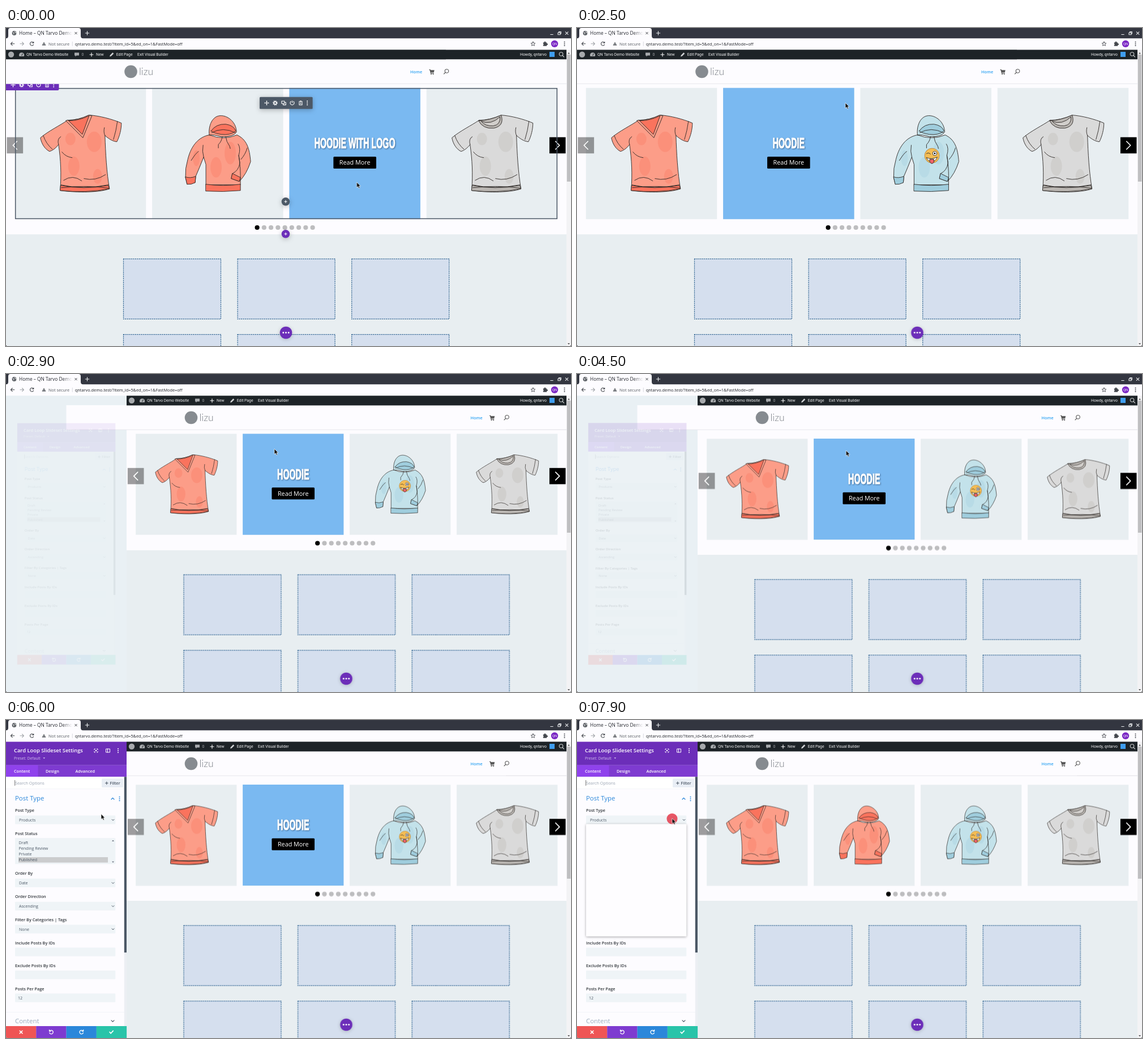
An HTML page that plays this animation: 998x561 px, repeating every 8 s.

```html
<!DOCTYPE html>
<html lang="en">
<head>
<meta charset="utf-8">
<title>Page builder demo</title>
<style>
html, body { margin: 0; width: 100%; height: 100%; overflow: hidden; background: #1c1e22; }
#stage { display: block; width: 998px; height: 561px; border-radius: 0 0 3px 3px; }
text { white-space: pre; }
.ui { font-family: "Noto Sans", sans-serif; }
.bar { font: 6.85px Roboto, sans-serif; fill: #f0f0f1; }
.os { font-family: "Open Sans", sans-serif; }
.semi { font-weight: 600; }
.line { fill: none; stroke-linecap: round; stroke-linejoin: round; }
.ink { stroke: #2b2624; stroke-width: .9; stroke-linejoin: round; stroke-linecap: round; }
.icon { fill: none; stroke: #fff; stroke-width: 1.1; stroke-linejoin: round; }
.headline { font: bold 26px "Liberation Sans", Arial, sans-serif; fill: #fff; stroke: #fff; stroke-width: 1.1; text-anchor: middle; }
.shade { filter: drop-shadow(1.4px 1.8px .8px rgba(25, 55, 90, .6)); }

/* One 8 s clock for every moving part: 100 ms = 1.25% */
.a { animation: 8s linear infinite; }
.cut { animation-timing-function: step-end; }
#cursor { animation-name: point; }
#hoverLogo { animation-name: leaveLogo; }
#hoverWide { animation-name: enterHood; }
#hoverSlim { animation-name: leaveHood; }
#tap1 { animation-name: tap1; }
#tap2 { animation-name: tap2; }
#tools { animation-name: tools; }
#wide { animation-name: wide; }
#slim { animation-name: slim; }
#barLeft { animation-name: barLeft; }
#head { animation-name: head; }
#lower { animation-name: lower; }
#backdrop { animation-name: backdrop; }
#thumb { animation-name: thumb; transform-origin: 994px 47px; }
#more { animation-name: more; }
#panel { animation-name: panel; transform-origin: 106.5px 299.5px; }
#menu { animation-name: menu; }

@keyframes point {
  0%, 1% { transform: translate(619.5px, 272px); animation-timing-function: ease-in-out; }
  9.4%, 46% { transform: translate(474px, 132px); }
  50%, 58.75% { transform: translate(475.3px, 135px); animation-timing-function: ease-in-out; }
  70%, 87.5% { transform: translate(168px, 165.7px); animation-timing-function: ease-in-out; }
  92.5%, 100% { transform: translate(168px, 173.5px); }
}
@keyframes leaveLogo { 0%, 5.5% { opacity: 1; } 9.2%, 100% { opacity: 0; } }
@keyframes enterHood { 0%, 16.25% { opacity: 0; } 20%, 100% { opacity: 1; } }
@keyframes leaveHood { 0%, 76.25% { opacity: 1; } 80%, 100% { opacity: 0; } }
@keyframes tap1 { 0%, 8.4% { opacity: 0; } 9.4%, 12.5% { opacity: .8; } 15%, 100% { opacity: 0; } }
@keyframes tap2 { 0%, 94% { opacity: 0; } 95.5%, 100% { opacity: .72; } }
@keyframes tools { 0% { visibility: visible; } 13.75%, 100% { visibility: hidden; } }
@keyframes wide { 0% { visibility: visible; } 33.12%, 100% { visibility: hidden; } }
@keyframes slim {
  0% { visibility: hidden; transform: none; }
  33.12% { visibility: visible; transform: none; }
  38.6%, 100% { visibility: visible; transform: translateY(8.5px); }
}
@keyframes barLeft { 0% { transform: none; } 33.12%, 100% { transform: translateX(213px); } }
@keyframes head { 0% { transform: none; } 33.12%, 100% { transform: translateX(106.5px); } }
@keyframes lower {
  0% { transform: none; }
  33.12% { transform: translate(106.5px, -53.3px); }
  38.6%, 100% { transform: translate(106.5px, -44.8px); }
}
@keyframes backdrop { 0% { visibility: hidden; } 33.12%, 100% { visibility: visible; } }
@keyframes thumb { 0% { transform: none; } 33.12%, 100% { transform: scaleY(1.04); } }
@keyframes more {
  0%, 18.75% { transform: none; animation-timing-function: ease-in-out; }
  23.75%, 100% { transform: translateX(106.5px); }
}
@keyframes panel {
  0%, 33.6% { opacity: 0; transform: scale(.815); }
  36.2% { opacity: .08; transform: scale(.815); }
  56.25% { opacity: .13; transform: scale(.815); animation-timing-function: ease-out; }
  60.5%, 100% { opacity: 1; transform: none; }
}
@keyframes menu { 0%, 96% { opacity: 0; } 97.4%, 100% { opacity: 1; } }
</style>
</head>
<body>
<svg id="stage" viewBox="0 0 998 561" xmlns="http://www.w3.org/2000/svg">
<defs>
  <g id="iMove" class="icon"><path d="M-3.5 0H3.5M0-3.5V3.5"/><path d="M-4.3 0l1.5-1.3v2.6zM4.3 0l-1.5-1.3v2.6zM0-4.3l-1.3 1.5h2.6zM0 4.3l-1.3-1.5h2.6z" fill="#fff" stroke="none"/></g>
  <g id="iGear" class="icon"><circle r="2.3" stroke-width="1.6"/><circle r="3.7" stroke-width="1.3" stroke-dasharray="1.45"/></g>
  <g id="iCopy" class="icon"><path d="M-3.6-3.3H1.4V1H-3.6zM-1 1V3.3H3.8V-1H1.4"/></g>
  <g id="iPower" class="icon"><path d="M-2-3A3.5 3.5 0 1 0 2-3M0-4V0"/></g>
  <g id="iTrash" class="icon"><path d="M-3.3-2.5H3.3M-1.2-3.6H1.2M-2.5-1.6V3.4H2.5V-1.6M0-1V2"/></g>
  <g id="iDots" fill="currentColor"><circle cy="-3.2" r="1"/><circle r="1"/><circle cy="3.2" r="1"/></g>
  <g id="iFind" class="line" stroke-width="1.1"><circle cx="1" cy="-1" r="3.3"/><path d="M-1.4 1.4L-4 4"/></g>
  <g id="tools6">
    <use href="#iMove" x="12.5"/><use href="#iGear" x="27.5"/><use href="#iCopy" x="42.5"/>
    <use href="#iPower" x="57.5"/><use href="#iTrash" x="72.5"/><use href="#iDots" x="84.2" color="#fff"/>
  </g>

  <!-- clothes, in the space of a 231.5 px card -->
  <g id="tee" class="ink">
    <path fill="var(--c)" d="M93 57C80 66 59 76 45 88C47 99 53 108 61 112C68 110 73 105 77 100C81 128 82 150 80 181C100 184 145 186 167 178C162 150 160 115 159 84C166 90 172 94 180 95C185 85 188 73 188 62C172 55 148 49 132 48Q112 57 93 57Z"/>
    <g fill="var(--d)" stroke="none" opacity=".3"><ellipse cx="104" cy="138" rx="10" ry="17"/><ellipse cx="140" cy="95" rx="13" ry="18"/><ellipse cx="98" cy="90" rx="9" ry="11"/><ellipse cx="146" cy="156" rx="8" ry="13"/></g>
    <path fill="var(--d)" d="M81 172Q120 180 165 172L167 178Q125 186 80 181Z"/>
    <path fill="none" d="M81 171Q120 180 165 171M82 176Q128 171 166 177M50 84Q55 99 66 108M181 59Q179 75 174 91M77 100Q74 90 81 86M159 84Q156 78 158 70M83 113Q90 122 101 123M86 163Q102 152 118 164M122 160Q142 165 160 153"/>
  </g>
  <g id="vneck" style="--c:#fc9d88;--d:#fa735d">
    <use href="#tee"/>
    <path class="ink" fill="var(--c)" d="M90 58L120 88L136 49L130 48Q112 57 93 57Z"/>
    <path class="ink" fill="var(--d)" d="M95 58L119 82L131 49Q113 58 95 58Z"/>
  </g>
  <g id="crew" style="--c:#dadada;--d:#bab6b2">
    <use href="#tee"/>
    <path class="ink" fill="var(--d)" d="M92 58Q112 57 132 48Q138 67 119 71Q100 73 92 58Z"/>
    <path class="ink" fill="#d1cecb" d="M97 59Q114 66 130 51Q131 65 118 67Q104 68 97 59Z"/>
  </g>
  <g id="hood" class="ink">
    <path fill="var(--c)" d="M101 83C83 86 69 101 63 126Q58 142 59 158L62 170L76 167L77 156Q84 140 91 122L95 135V171H156V155Q156 140 153 119L155 132Q153 146 142 151L140 160L154 165Q167 152 174 130C172 106 167 91 150 83Q126 93 101 83Z"/>
    <g fill="var(--d)" stroke="none" opacity=".3"><ellipse cx="113" cy="140" rx="10" ry="18"/><ellipse cx="138" cy="115" rx="10" ry="20"/><ellipse cx="78" cy="124" rx="6" ry="14"/></g>
    <path fill="var(--d)" d="M95 170Q125 174 156 170V181Q125 184 95 182ZM59 157Q67 160 77 156L76 167Q69 171 62 170ZM142 151L156 158L154 165L140 160Z"/>
    <path fill="var(--c)" d="M101 83C99 67 106 50 120 49C134 48 149 61 149 78Q143 87 122 86Q109 82 101 83Z"/>
    <path fill="var(--d)" d="M104 76Q113 63 130 64Q144 66 148 76Q138 84 122 82Q109 80 104 76Z"/>
    <path fill="none" d="M105 79Q125 68 147 79M124 86Q123 94 117 100V106M130 86Q131 95 137 103L138 107M91 122Q88 112 90 101M153 119Q157 106 152 99M69 128Q77 115 82 112M157 126Q165 117 168 106"/>
  </g>
  <g id="hoodRed" style="--c:#fc9d88;--d:#fa735d"><use href="#hood"/></g>
  <g id="hoodBlue" style="--c:#c3e2ea;--d:#9fcddd">
    <use href="#hood"/>
    <circle cx="126.7" cy="119.5" r="13" fill="#f4bd55" stroke="#a9722c" stroke-width=".7"/>
    <path class="ink" fill="none" d="M117 116Q121 113 124 117"/>
    <circle class="ink" cx="131.5" cy="115.5" r="3.7" fill="#fff"/><circle cx="131.5" cy="115.5" r="1.4"/>
    <path class="ink" fill="#fff" d="M117 123Q126 127 136 122Q133 130 126 130Q119 129 117 123Z"/>
    <path class="ink" fill="#f0656a" d="M123 126H130V131Q126.500 136 123 131Z"/>
  </g>
</defs>

<rect width="998" height="561" fill="#fdfcff"/>
<g id="lower" class="a cut"></g>
<g id="wide" class="a cut"></g>
<g id="backdrop" class="a cut"><path fill="#e9f0f4" d="M0 38H213V561H0z"/></g>
<g id="slim" class="a cut"></g>

<g id="tools" class="a cut">
  <rect x="16.700" y="106.600" width="956.600" height="229.800" fill="none" stroke="#4c5866" stroke-width="1.5"/>
  <path d="M0 98H93.500V107.500Q93.500 110 91 110H0Z" fill="#6c2eb9"/>
  <use href="#tools6" y="100.500"/>
  <g style="filter:drop-shadow(0 2px 4px rgba(0,0,0,.25))">
    <rect x="448" y="121.800" width="93.600" height="21" rx="1.5" fill="#4c5866"/>
    <circle cx="494" cy="306.300" r="7.300" fill="#4c5866"/><circle cx="494" cy="363.300" r="7.300" fill="#6c2eb9"/>
  </g>
  <use href="#tools6" x="448" y="132.300"/>
  <path class="icon" d="M491.500 306.300h5M494 303.800v5M491.500 363.300h5M494 360.800v5"/>
</g>

<path fill="#fdfcff" d="M213 55H990V98H213z"/>
<g id="head" class="a cut">
  <path fill="#fdfcff" d="M0 55H883V98H0z"/>
  <path d="M0 98.300H883.500" stroke="#e6e6ec"/>
  <circle cx="220.500" cy="77" r="11.300" fill="#868b90"/>
  <text x="235" y="83" font-family="Lato, sans-serif" font-weight="300" font-size="17.500" fill="#757b81">lizu</text>
  <text class="os semi" x="714" y="79.500" font-size="7.300" fill="#2ea3f2">Home</text>
  <g fill="#555"><path d="M747.500 73h2l.6 1.300h6.600l-1 4.200h-5l.3 1h4.700v.9h-5.600l-1.800-6.500h-.8z"/><circle cx="751" cy="81.300" r="1"/><circle cx="754.600" cy="81.300" r="1"/></g>
  <use href="#iFind" x="777.500" y="77" stroke="#555"/>
</g>
<path d="M883 98.300H990" stroke="#e6e6ec"/>
<path id="adminBg" fill="#1d2327" d="M213 38.200H990V55.200H213z"/>
<g id="barLeft" class="a cut">
  <path fill="#1d2327" d="M0 38.200H777V55.200H0z"/>
  <circle cx="9" cy="46.800" r="5.200" fill="#a7aaad"/>
  <path d="M23.600 50a4.600 4.600 0 1 1 8 0z" fill="#a7aaad"/><path d="M27.600 49l1.800-4" stroke="#1d2327"/>
  <path d="M121 43.500h8v5h-4.500l-2 2v-2H121z" fill="#a7aaad"/>
  <path class="icon" d="M147.500 47h7M151 43.500v7" stroke-width="1.4"/>
  <path d="M183 50.500l.8-2.600 4.600-4.600 1.900 1.900-4.700 4.600z" fill="#d0d2d4"/>
  <g class="bar">
    <text x="36" y="49.300">QN Tarvo Demo Website</text><text x="133.500" y="49.300" fill="#a7aaad">0</text>
    <text x="159" y="49.300">New</text><text x="194.800" y="49.300">Edit Page</text><text x="232" y="49.300">Exit Visual Builder</text>
  </g>
</g>
<text class="bar" x="908" y="49.300">Howdy, qntarvo</text>
<rect x="960" y="42" width="9" height="9" fill="#3f9df0"/>
<use href="#iFind" x="981.500" y="47" stroke="#d0d2d4" transform="translate(1963 0) scale(-1 1)"/>

<path fill="#f3f3f5" d="M990 38.200H998V561H990z"/>
<rect id="thumb" class="a cut" x="990.800" y="47" width="6.600" height="224" fill="#bfbfc1"/>
<path fill="#555" d="M992 45.500h4l-2-2.500zM992 556h4l-2 2.500z"/>

<g id="more" class="a">
  <circle cx="494.500" cy="537.500" r="10.800" fill="#6c2eb9" style="filter:drop-shadow(0 1px 3px rgba(0,0,0,.2))"/>
  <g fill="#fff"><circle cx="489.800" cy="537.500" r="1.400"/><circle cx="494.500" cy="537.500" r="1.400"/><circle cx="499.200" cy="537.500" r="1.400"/></g>
</g>

<g id="panel" class="a"></g>
<g id="menu" class="a"><rect x="16" y="183.500" width="177.300" height="198.300" rx="1.500" fill="#fefdff" style="filter:drop-shadow(0 1px 2px rgba(0,0,0,.35))"/></g>

<!-- browser frame -->
<path fill="#333640" d="M0 0H998V18.500H0z"/>
<path fill="#fdfcff" d="M0 18.500Q4 18 4 14V4Q4 0 8 0H128Q132 0 132 4V14Q132 18 136 18.500H998V38.200H0z"/>
<circle cx="14.500" cy="9" r="3.900" fill="#5f6368"/><path class="line" d="M12 7.500l2 1.200-.5 2M15.500 6l.5 1.600 2 .8" stroke="#fff" stroke-width=".9"/>
<text class="ui" x="23" y="12.200" font-size="8.300" fill="#33363c">Home – QN Tarvo Demo</text>
<linearGradient id="fade"><stop stop-color="#fdfcff" stop-opacity="0"/><stop offset="1" stop-color="#fdfcff"/></linearGradient>
<path d="M100 3H117V15H100z" fill="url(#fade)"/>
<path class="line" d="M121.700 7.300l3.600 3.600M125.300 7.300l-3.600 3.600" stroke="#44474d"/>
<path class="line" d="M140.300 9h6.400M143.500 5.800v6.400M961.800 11.500h4.400M988.300 6.800l4.600 4.600M992.900 6.800l-4.600 4.600M975 8.200h4v3.600h-4zM976.500 8V6.600h3.800V10H979" stroke="#eceef0" stroke-width="1.100"/>
<path class="line" d="M14.800 27.800H8.500M11.200 25L8.400 27.800l2.800 2.800" stroke="#44474d" stroke-width="1.100"/>
<path class="line" d="M25 27.800h6.300M28.600 25l2.800 2.800-2.800 2.800" stroke="#a0a3a8" stroke-width="1.100"/>
<path class="line" d="M48.600 29.200a3.200 3.200 0 1 1-.2-3.200M48.800 24.500v2h-2" stroke="#44474d" stroke-width="1.100"/>
<path d="M67 24.500l3.500 6.200h-7z" fill="#5f6368"/><path d="M67 26.800v1.800M67 29.200v.8" stroke="#fff" stroke-width=".7"/>
<g class="ui" font-size="7.300"><text x="75" y="30.500" fill="#5f6368">Not secure</text><text x="121.800" y="30.500" fill="#2c2f33">qntarvo.demo.test/?item_id=5&amp;ed_on=1&amp;FastMode=off</text></g>
<path d="M117.300 24v8" stroke="#c9cbd0" stroke-width=".7"/>
<path class="line" d="M931 24.200l1.100 2.500 2.700.2-2 1.800.6 2.600-2.400-1.400-2.400 1.400.6-2.600-2-1.800 2.700-.2z" stroke="#44474d" stroke-width=".9"/>
<path d="M948.800 25.500h2a1.300 1.300 0 1 1 2.400 0h2v2a1.300 1.300 0 1 1 0 2.400v1.800h-6.400v-1.800a1.300 1.300 0 0 0 0-2.400z" fill="#44474d"/>
<circle cx="969" cy="27.900" r="6.200" fill="#7a27c4"/><text class="ui" x="969" y="30" font-size="5.600" fill="#fff" text-anchor="middle">QN</text>
<use href="#iDots" x="986.500" y="27.900" color="#44474d"/>

<circle id="tap1" class="a" cx="475" cy="132.500" r="9" fill="#d81a22"/>
<circle id="tap2" class="a" cx="168" cy="174.300" r="9.500" fill="#e2192c"/>
<g id="cursor" class="a"><path d="M0 0V9.600L2.200 7.600 3.800 11 5.500 10.200 3.900 6.900H6.800Z" fill="#0b0b0b" stroke="#fff" stroke-width=".7"/></g>
</svg>

<script>
const $ = id => document.getElementById(id);
const rect = (x, y, w, h, fill, more = '') => `<rect x="${x}" y="${y}" width="${w}" height="${h}" fill="${fill}" ${more}/>`;
const text = (x, y, size, fill, str, cls = '') => `<text class="os ${cls}" x="${x}" y="${y}" font-size="${size}" fill="${fill}">${str}</text>`;
const stroke = (d, color, w = 1) => `<path class="line" d="${d}" stroke="${color}" stroke-width="${w}"/>`;
const range = n => [...Array(n).keys()];

function hover(id, title, x, y, size) {
  const cx = x + size / 2, cy = y + size / 2;
  return `<g id="${id}" class="a">${rect(x, y, size, size, '#7ab9f1')}
    <g class="shade"><text class="headline" transform="translate(${cx} ${cy - 9}) scale(.55 1)">${title}</text></g>
    ${rect(cx - 37.8, cy + 5.6, 75.600, 21, '#000', 'rx="1.5"')}
    <text class="os" x="${cx}" y="${cy + 20}" font-size="10.800" fill="#fff" text-anchor="middle">Read More</text></g>`;
}

function carousel(left, top, size, step, mid, hovers) {
  const at = i => left + step * i, ay = top + size / 2 - 28.8;
  const cards = ['vneck', 'hoodRed', 'hoodBlue', 'crew'].map((art, i) =>
    rect(at(i), top, size, size, '#e8eef1') +
    `<use href="#${art}" transform="translate(${at(i)} ${top}) scale(${size / 231.5})"/>`);
  const layers = hovers.map(([id, title, i]) => hover(id, title, at(i), top, size));
  const dots = range(9).map(i =>
    `<circle cx="${mid - 49 + i * 12.25}" cy="${top + size + 14.8}" r="4.100" fill="${i ? '#bdbdbf' : '#000'}"/>`);
  const arrow = (x, fill, dir) => rect(x, ay, 28.600, 28.600, fill) +
    stroke(`M${x + 14.3 - 3.5 * dir} ${ay + 7.3}l${7 * dir} 7l${-7 * dir} 7`, '#fff', 1.6);
  return [...cards, ...layers, ...dots].join('') + arrow(left - 14.3, 'rgba(0,0,0,.38)', -1) + arrow(959.9, '#000', 1);
}

$('wide').innerHTML = carousel(15.800, 105.700, 231.500, 242.300, 492.600, [['hoverLogo', 'HOODIE WITH LOGO', 2], ['hoverWide', 'HOODIE', 1]]);
$('slim').innerHTML = carousel(229.200, 105.500, 178.200, 188.950, 599.200, [['hoverSlim', 'HOODIE', 1]]);

$('lower').innerHTML = rect(-110, 364, 993.500, 320, '#e8eef1') + rect(883, 364, 107, 320, '#e8eef1') +
  range(6).map(i => rect(207.500 + i % 3 * 201.600, 407.300 + (i / 3 | 0) * 133.400, 172, 106, '#d5dfee',
    'stroke="#2b608e" stroke-width="1.200" stroke-dasharray="2.100 1.300"')).join('');

function panel() {
  const dark = '#32373c', grey = '#4c5866', blue = '#2b87da';
  const down = (x, y, c = grey) => stroke(`M${x - 2} ${y - 1}l2 2l2-2`, c);
  const field = (y, h = 15.3) => rect(16, y, 177.300, h, '#eff4f7', 'rx="1"');
  const row = (y, label) => text(16, y, 7.3, dark, label, 'semi');
  const selects = [[162, 'Post Type', 'Products'], [273.300, 'Order By', 'Date'], [314.200, 'Order Direction', 'Ascending'],
    [354.700, 'Filter By Categories | Tags', 'None']];
  const inputs = [[395.500, 'Include Posts By IDs', ''], [436, 'Exclude Posts By IDs', ''], [476.500, 'Posts Per Page', '12']];
  const status = ['Draft', 'Pending Review', 'Private', 'Published'];
  const buttons = ['#ef5555', '#7e3bd0', blue, '#29c4a9'];
  return rect(0, 38.200, 213, 523, '#fdfcff') +
    rect(0, 38.200, 213, 41.500, '#6c2eb9') + rect(0, 79.500, 213, 20.700, '#7e3bd0') + rect(0, 79.500, 56.500, 20.700, '#8f42ec') +
    text(14, 57.200, 9.36, '#fff', 'Card Loop Slideset Settings', 'semi') +
    text(14, 69.800, 6.8, '#d3c0ee', 'Preset: Default') + '<path d="M65.500 66.300h3.600l-1.800 2.200z" fill="#d3c0ee"/>' +
    stroke('M156 52.500V51h1.500M160.500 51h1.500v1.500M162 55.500V57h-1.500M157.500 57H156v-1.500M177 51h6.500v6H177zM179.500 51v6', '#fff') +
    '<circle cx="159" cy="54" r="1.300" fill="#fff"/><use href="#iDots" x="198" y="54" color="#fff"/>' +
    [[14, 'Content'], [70, 'Design'], [122.500, 'Advanced']].map(([x, s]) => text(x, 92.700, 7.3, '#fff', s, 'semi')).join('') +
    rect(0, 100.200, 209, 21.300, '#fff') + rect(0, 121, 209, .6, '#eef1f5') +
    stroke('M15.700 106.500v9', '#333', .7) + text(16, 114, 7.3, '#98a2b0', 'Search Options') +
    rect(169, 103.500, 38, 15.500, '#e9eef5', 'rx="1.500"') + stroke('M175.500 111.300h4.600M177.800 109v4.600', grey, 1.1) +
    text(183.500, 114, 7.3, grey, 'Filter', 'semi') +
    text(16, 142.400, 11.4, blue, 'Post Type') + stroke('M186 140l2.500-2.500 2.500 2.500', blue, 1.2) +
    `<use href="#iDots" x="200.500" y="139" color="${blue}"/>` +
    selects.map(([y, label, val]) => row(y, label) + field(y + 6.500) + text(23, y + 16.800, 7.1, grey, val) + down(189, y + 14.300)).join('') +
    inputs.map(([y, label, val]) => row(y, label) + field(y + 6) + text(21, y + 16.300, 7.1, grey, val)).join('') +
    row(203.300, 'Post Status') + field(208.300, 46) + rect(22, 242, 158, 9.500, '#cbcccd') +
    status.map((s, i) => text(22.500, 219 + i * 10.100, 7.1, grey, s)).join('') +
    '<path d="M187 214h4l-2-2.300zM187 249.500h4l-2 2.300z" fill="#6b7280"/>' +
    rect(0, 515, 209, .7, '#eef1f5') + text(16, 535.200, 11.4, '#9aabbd', 'Content') + stroke('M186 529.800l2.500 2.500 2.500-2.500', grey, 1.2) +
    rect(208.800, 100.200, 4.200, 440, '#eceff3') + rect(208.800, 100.200, 4.200, 310, '#4c5866') +
    buttons.map((c, i) => rect(i * 53.250, 540, 53.400, 21, c)).join('') +
    stroke('M24.300 548.300l4.600 4.600M28.900 548.300l-4.600 4.600', '#fff', 1.6) +
    stroke('M77.300 548.600a3.300 3.300 0 1 1-.5 3.200M76.600 546.600v2.500h2.500', '#fff', 1.3) +
    stroke('M135.900 548.600a3.300 3.300 0 1 0 .5 3.200M136.600 546.600v2.500h-2.500', '#fff', 1.3) +
    stroke('M183 550.500l2.200 2.300 4-4.400', '#fff', 1.7);
}
$('panel').innerHTML = panel();
</script>
</body>
</html>
```
